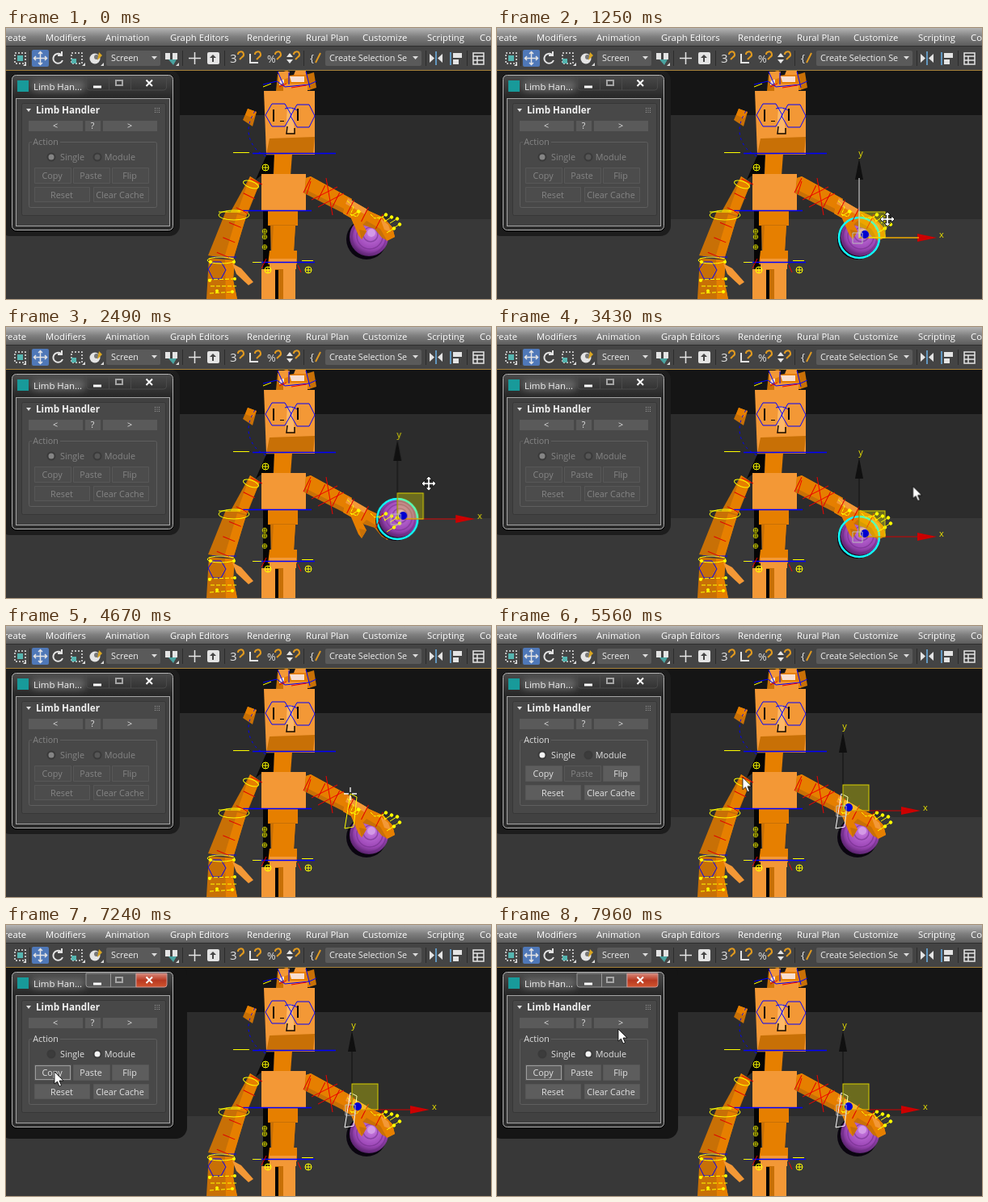
Recreate the animation shown at these times as an HTML page. Size 600 px wide and 336 px high, loop 8000 ms.

```html
<!DOCTYPE html>
<html lang="en">
<head>
<meta charset="utf-8">
<title>Character rig and tool panel</title>
<style>
html, body { margin: 0; width: 100%; height: 100%; overflow: hidden; background: #151515; }
svg { display: block; width: 600px; height: 336px; font: 11px "Open Sans", "Noto Sans", sans-serif; }
.menu { font-size: 11.3px; fill: #fff; }
.ui { font-size: 10.8px; }
.mid { text-anchor: middle; }
.line { fill: none; }
.lt { fill: #f39836; } .md { fill: #e67f00; } .dk { fill: #c87006; } .sh { fill: #050505; }
.blue { stroke: #00f; } .yel { stroke: #ff0; } .red { stroke: #f00000; }
.tick { fill: none; stroke: #e00000; stroke-dasharray: 1 19; }
.axis { font-size: 11px; fill: #e8e000; text-anchor: middle; }

/* One loop is 8 s, so 1% is 80 ms. */
.ball, .cursor { animation: 8s linear infinite; }
.ball { animation-name: ball; }
.cursor { animation-name: cursor; }
.sel, .hot, .hover, .wrist, .front, .arrow, .cross, .move, .active, .passive, .on, .pasteOn,
.single, .module, .focusModule, .focusCopy, .plate, .pastePlate {
  animation: 8s step-end infinite;
}
.sel { animation-name: sel; }
.hot { animation-name: hot; }
.hover { animation-name: hover; }
.wrist { animation-name: wrist; }
.front { animation-name: front; }
.arrow { animation-name: arrow; }
.cross { animation-name: cross; }
.move { animation-name: move; }
.active { animation-name: active; }
.passive { animation-name: passive; }
.on { animation-name: on; }
.pasteOn { animation-name: pasteOn; }
.plate { animation-name: plate; }
.pastePlate { animation-name: pastePlate; }
.single { animation-name: single; }
.module { animation-name: module; }
.focusModule { animation-name: focusModule; }
.focusCopy { animation-name: focusCopy; }

@keyframes ball {
  0%, 16.1% { transform: translate(448px, 260px); }
  18.1% { transform: translate(467px, 255px); }
  24.1%, 24.6% { transform: translate(394px, 268px); }
  26.6% { transform: translate(390px, 282px); }
  31.1% { transform: translate(484px, 239px); }
  32% { transform: translate(489px, 215px); }
  33%, 38.74% { transform: translate(482px, 189px); }
  38.75%, 100% { transform: translate(448px, 260px); }
}
@keyframes cursor {
  0%, 4.6% { transform: translate(640px, 300px); }
  9.4%, 10.6% { transform: translate(456px, 262px); }
  12.1%, 16.1% { transform: translate(483px, 237px); }
  18.1% { transform: translate(506px, 232px); }
  24.1% { transform: translate(459px, 256px); }
  24.6% { transform: translate(459px, 254px); }
  26.6% { transform: translate(452px, 262px); }
  31.1% { transform: translate(523px, 195px); }
  33% { transform: translate(522px, 150px); }
  34.6%, 41.9% { transform: translate(517px, 203px); }
  48.75%, 51.9% { transform: translate(500px, 165px); }
  57.4% { transform: translate(430px, 206px); }
  58.3%, 65.5% { transform: translate(426px, 208px); }
  75% { transform: translate(137px, 160px); }
  76%, 79.5% { transform: translate(135px, 162px); }
  88.5%, 92.5% { transform: translate(60px, 182px); }
  99.5%, 100% { transform: translate(150px, 129px); }
}
@keyframes sel { 0% { opacity: 0 } 10.6% { opacity: 1 } 48.75% { opacity: 0 } }
@keyframes hot { 0% { opacity: 0 } 12.1% { opacity: 1 } 16.1% { opacity: 0 } }
@keyframes hover { 0% { opacity: 0 } 57.4% { opacity: 1 } 59.9% { opacity: 0 } }
@keyframes wrist { 0% { opacity: 0 } 59.9% { opacity: 1 } }
@keyframes front { 0% { opacity: 1 } 26.6% { opacity: 0 } 38.75% { opacity: 1 } }
@keyframes arrow { 0% { opacity: 1 } 9.4% { opacity: 0 } 35.1% { opacity: 1 } 57.4% { opacity: 0 } 67% { opacity: 1 } }
@keyframes cross { 0% { opacity: 0 } 9.4% { opacity: 1 } 10.6% { opacity: 0 } 57.4% { opacity: 1 } 59.9% { opacity: 0 } }
@keyframes move { 0% { opacity: 0 } 10.6% { opacity: 1 } 35.1% { opacity: 0 } 59.9% { opacity: 1 } 67% { opacity: 0 } }
@keyframes active { 0% { opacity: 0 } 76% { opacity: 1 } }
@keyframes passive { 0% { opacity: 1 } 76% { opacity: 0 } }
@keyframes on { 0% { fill: #858585 } 59.9% { fill: #e2e2e2 } }
@keyframes pasteOn { 0% { fill: #858585 } 90.5% { fill: #e2e2e2 } }
@keyframes plate { 0% { fill: #4c4c4c } 59.9% { fill: #5d5d5d } }
@keyframes pastePlate { 0% { fill: #4c4c4c } 90.5% { fill: #5d5d5d } }
@keyframes single { 0% { fill: #858585 } 59.9% { fill: #f4f4f4 } 77% { fill: #3c3c3c } }
@keyframes module { 0% { fill: #565656 } 59.9% { fill: #3c3c3c } 77% { fill: #f4f4f4 } }
@keyframes focusModule { 0% { opacity: 0 } 77% { opacity: 1 } 90.5% { opacity: 0 } }
@keyframes focusCopy { 0% { opacity: 0 } 90.5% { opacity: 1 } }
</style>
</head>
<body>
<svg viewBox="0 0 600 336">
<defs>
  <linearGradient id="menuBg" x2="0" y2="1">
    <stop offset="0" stop-color="#b4b4b4"/><stop offset=".5" stop-color="#7e7e7e"/><stop offset="1" stop-color="#5c5c5c"/>
  </linearGradient>
  <linearGradient id="titleBg" x2="0" y2="1">
    <stop offset="0" stop-color="#4b4b4b"/><stop offset=".15" stop-color="#262626"/><stop offset="1" stop-color="#2c2c2c"/>
  </linearGradient>
  <linearGradient id="closeBg" x2="0" y2="1">
    <stop offset="0" stop-color="#d98a7c"/><stop offset=".5" stop-color="#b93a22"/><stop offset="1" stop-color="#d0542e"/>
  </linearGradient>
  <radialGradient id="ballBg" cx=".56" cy=".4" r=".6">
    <stop offset="0" stop-color="#cc86e2"/><stop offset=".25" stop-color="#b866d2"/>
    <stop offset=".7" stop-color="#9c46b6"/><stop offset="1" stop-color="#5c2470"/>
  </radialGradient>
  <filter id="soft" x="-20%" y="-60%" width="140%" height="220%"><feGaussianBlur stdDeviation="4"/></filter>
  <g id="knob" class="line yel"><circle r="4"/><path d="M-4 0H4M0-4V4"/></g>
  <g id="pin" class="yel"><path d="M0 0L8-5"/><circle cx="9" cy="-5.500" r="1.800" fill="#ff0"/></g>
  <path id="hook" class="line" stroke="#e09a20" stroke-width="2" d="M0 3A3.500 3.500 0 1 1 5 6L2 9"/>

  <g id="gizmo">
    <path d="M0 0V-74" stroke="#111"/>
    <path d="M-5-72H5L0-98Z" fill="#101010"/>
    <path d="M0 0H74" stroke="#d00000" stroke-width="1.2"/>
    <path d="M72-5V5L96 0Z" fill="#cc0000"/>
    <rect y="-32" width="32" height="32" fill="#ff0" fill-opacity=".3" stroke="#d8d000"/>
    <text class="axis" x="2" y="-101">y</text><text class="axis" x="102" y="0">x</text>
    <circle cx="7" cy="-4" r="5" fill="#0000d0"/>
    <path class="line" stroke="#bbb" d="M-8 7V-6H4V7Z"/>
  </g>

  <g id="hand">
    <path class="md" d="M421 211L445 225 467 235 478 247 481 259 471 264 463 250 440 243 417 230Z"/>
    <path class="lt" d="M423 211L447 225 444 231 420 218Z"/>
    <path class="dk" d="M446 239L463 249 471 263 465 260 456 249 441 244Z"/>
    <path class="lt" d="M463 236L473 244 476 253 468 250Z"/>
    <path class="md" d="M425 231L434 229 446 252 440 262 436 257Z"/>
    <path class="dk" d="M437 250L446 252 440 262Z"/>
  </g>
</defs>

<!-- viewport -->
<path fill="#151515" d="M0 53H600V108H0Z"/>
<path fill="#2c2c2c" d="M0 108H600V237H0Z"/>
<path fill="#383838" d="M0 237H600V336H0Z"/>

<!-- body -->
<g>
  <path class="sh" d="M309 188L318 181V300H327V226L332 158H322Z"/>
  <path class="dk" d="M336 57L346 53H349L344 78H334ZM371 58L381 55 384 74 375 77Z"/>
  <path class="md" d="M343 60L372 56 376 77H343Z"/>
  <path fill="#f8ded0" d="M339 62L344 57V68L338 71ZM351 60H369V67H353Z"/>
  <path class="lt" d="M337 54H351L349 62 337 66ZM358 53H371V58H356ZM343 69H373V78H343Z"/>
  <path class="dk" d="M299 100L310 104 305 122 293 114Z"/>
  <path class="md" d="M299 100L310 104 306 112 296 108Z"/>
  <path class="md" d="M332 156H354L352 183H331Z"/>
  <path class="lt" d="M319 78H382V157H322Z"/>
  <path class="dk" d="M326 137L382 135 380 156 322 157Z"/>
  <path class="sh" d="M330 101h2v15h-2zM360 100h2v15h-2zM339 115h5v1h-5z"/>
  <path fill="#ffb868" d="M348 98H354L357 130H346Z"/>
  <path class="line" stroke="#140a00" stroke-width="1.500" d="M348 122L347 131H357V124"/>
  <path class="md" d="M324 226H361V245H324Z"/>
  <path class="lt" d="M316 181H371V227H316Z"/>
  <path class="dk" d="M327 244H358L356 277H328Z"/>
  <path class="md" d="M331 245H358L356 277H329Z"/>
  <path class="md" d="M326 276H360V293H324Z"/>
  <path class="lt" d="M326 286H359V299H326Z"/>
  <path class="dk" d="M316 299H358V336H316Z"/>
  <path class="lt" d="M316 299H333V336H316ZM343 299H358V336H343Z"/>
  <path class="sh" d="M333 300H337V336H333Z"/>

  <path class="dk" d="M302 184L314 192 295 240 275 233Z"/>
  <path class="md" d="M302 184L314 192 297 232 286 229Z"/>
  <path class="dk" d="M272 227L297 234 281 287 250 282Z"/>
  <path class="md" d="M286 231L297 234 281 287 270 285Z"/>
  <path class="dk" d="M251 285L283 288 281 313 286 336H248Z"/>
  <path class="md" d="M271 287L283 288 281 312 286 336H272Z"/>
  <path class="lt" d="M280 292L291 298 306 315 300 319 285 305Z"/>

  <path class="dk" d="M371 186L377 184 428 212 420 231 369 205Z"/>
  <path class="md" d="M371 186L377 184 428 212 422 226 370 200Z"/>
</g>

<!-- ball between palm and fingers -->
<use href="#hand"/>
<g class="ball">
  <circle cx="-2" cy="2" r="25" fill="#0a0510"/>
  <circle cx="1" cy="-1" r="24" fill="url(#ballBg)"/>
  <g class="line" stroke="#6e2c86" stroke-opacity=".55" stroke-width="1.500">
    <circle cx="3" cy="-4" r="9"/><circle cx="2" cy="-2" r="16"/><circle cx="1" cy="-1" r="21"/>
  </g>
  <circle cx="4" cy="-6" r="5" fill="#d39ae6"/>
</g>
<use href="#hand" class="front"/>
<g class="ball"><circle class="sel line" r="25" stroke="#1ff" stroke-width="2.500"/></g>

<!-- rig controls -->
<g class="line">
  <g class="blue">
    <path d="M321 108L329 94H345L353 108 345 122H329ZM352 109L360 95H375L382 109 375 123H360ZM345 100Q353 97 360 102"/>
    <path d="M318 70L335 66 345 73 375 70 384 66M336 54L344 72M371 54L376 74M350 70V55"/>
    <path d="M308 103Q296 122 302 138T324 160" stroke-dasharray="3 4"/>
    <path d="M305 155.500H408M293 226.500H378M308 290.500H382" stroke-width="1.300"/>
    <path d="M250 299L256 290H266L272 300 266 311H256ZM255 284H285"/>
  </g>
  <g class="yel">
    <path d="M281 154.500H301M318 73L328 69M263 228H290M305 290.500H316M366 288.500H380"/>
    <ellipse cx="282" cy="232" rx="19" ry="6"/>
    <ellipse cx="266" cy="288" rx="17" ry="4"/>
    <ellipse cx="303" cy="194" rx="10" ry="4" transform="rotate(20 303 194)"/>
    <path d="M250 312L284 311M253 320H285M252 329L282 327" stroke-dasharray="5 2"/>
    <path d="M422 214L430 222 426 231 434 234 439 227M451 231L456 236 466 234 470 241" stroke-dasharray="4 1"/>
  </g>
  <g class="red">
    <path d="M338 73L347 69M353 74L372 71M316 298L322 286M361 294L365 303M377 190L372 206M396 186L404 232M410 197L378 213M418 205L386 222"/>
  </g>
  <path class="tick" stroke-width="16" d="M310 190L286 238 268 282"/>
  <path class="tick" stroke-width="20" d="M372 195L424 221 468 243"/>
</g>
<use href="#knob" x="321" y="173"/><use href="#knob" x="324" y="300"/><use href="#knob" x="374" y="300"/>
<g transform="translate(320 252) scale(.7)"><use href="#knob"/><use href="#knob" y="10"/><use href="#knob" y="28"/></g>
<use href="#pin" x="461" y="237"/><use href="#pin" x="468" y="240"/><use href="#pin" x="475" y="242"/>
<use href="#pin" x="478" y="249"/><use href="#pin" x="471" y="254"/><use href="#pin" x="427" y="233"/>
<g fill="#ff0">
  <circle cx="252" cy="313" r="2"/><circle cx="283" cy="311" r="2"/><circle cx="253" cy="290" r="2"/>
  <circle cx="282" cy="290" r="2"/><circle cx="261" cy="326" r="2"/><circle cx="280" cy="327" r="2"/>
</g>
<path class="line yel hover" d="M426 208L434 212 430 249 419 251Z"/>
<g class="wrist">
  <path class="line" stroke="#fff" d="M426 208L434 212 430 249 419 251Z"/>
  <use href="#gizmo" x="428" y="229"/>
</g>
<g class="ball">
  <g class="sel">
    <use href="#gizmo"/>
    <g class="hot"><path d="M0 0V-74" stroke="#eee"/><path d="M12 0H74" stroke="#ff0"/></g>
  </g>
</g>

<!-- floating panel -->
<rect class="passive" x="-8" y="52" width="223" height="206" rx="13" fill="#1d1d1d"/>
<rect class="active" x="-8" y="48" width="232" height="217" rx="14" fill="#151515"/>
<rect x="6.500" y="57.500" width="201" height="195" rx="6" fill="#0a0a0a"/>
<rect x="7.500" y="58.500" width="199" height="192" rx="5" fill="url(#titleBg)" stroke="#b5b5b5"/>
<rect x="32" y="66" width="66" height="13" rx="5" fill="#a0a0a0" opacity=".45" filter="url(#soft)"/>
<rect x="14" y="65" width="14" height="14" fill="#189a9a"/>
<text x="34" y="77" fill="#f2f2f2" font-size="11.400">Limb Han...</text>
<path class="line passive" stroke="#4a4a4a" d="M99.500 60V74Q100 77 103 77H195Q198 77 198.500 74V60M127.500 60V77M154.500 60V77"/>
<g class="active">
  <path d="M99 60V74Q99 77 102 77H161V60Z" fill="#555" stroke="#999"/>
  <path d="M129.500 60V77" stroke="#999"/>
  <path d="M161 60H199V74Q199 77 196 77H161Z" fill="url(#closeBg)" stroke="#c99"/>
</g>
<path class="line" stroke="#fff" stroke-width="3" d="M108 73H118"/>
<rect class="line" x="136" y="65" width="8" height="6" stroke="#a5a5a5" stroke-width="2"/>
<path class="line" stroke="#fff" stroke-width="2" d="M173.500 64.500L181 72M181 64.500L173.500 72"/>
<rect x="12.500" y="87.500" width="190" height="158" fill="#414141" stroke="#a5a5a5"/>
<rect x="19.500" y="93.500" width="178" height="139" rx="2" fill="#484848" stroke="#373737"/>
<path d="M25 100H31L28 104Z" fill="#ddd"/>
<text x="37" y="106" fill="#f0f0f0" font-weight="700" font-size="11.700">Limb Handler</text>
<path class="line" stroke="#a0a0a0" stroke-dasharray="1 1.500" d="M184 99.500H190M184 102H190M184 104.500H190"/>
<g class="ui mid">
  <path fill="#5a5a5a" d="M28 115h67v13h-67zM98 115h19v13h-19zM120 115h67v13h-67z"/>
  <g fill="#e2e2e2"><text x="61" y="125">&lt;</text><text x="107" y="125">?</text><text x="153" y="125">&gt;</text></g>
  <rect class="line" x="28.500" y="141.500" width="158" height="81" rx="2" stroke="#5e5e5e"/>
  <path fill="#484848" d="M32 138H67V146H32Z"/>
  <text class="on" x="49" y="145">Action</text>
  <circle cx="56" cy="160" r="5.500" fill="#3a3a3a"/><circle class="single" cx="56" cy="160" r="3.500"/>
  <circle cx="113" cy="160" r="5.500" fill="#3a3a3a"/><circle class="module" cx="113" cy="160" r="3.500"/>
  <text class="on" x="82" y="164">Single</text><text class="on" x="141" y="164">Module</text>
  <g stroke="#575757">
    <path class="plate" d="M35.500 173.500h45v19h-45zM131.500 173.500h45v19h-45zM35.500 197.500h68v18h-68zM108.500 197.500h68v18h-68z"/>
    <path class="pastePlate" d="M83.500 173.500h45v19h-45z"/>
  </g>
  <text class="on" x="57" y="187">Copy</text><text class="pasteOn" x="105" y="187">Paste</text><text class="on" x="153" y="187">Flip</text>
  <text class="on" x="69" y="211">Reset</text><text class="on" x="141" y="211">Clear Cache</text>
  <g class="line" stroke="#ddd" stroke-dasharray="1 1">
    <path class="focusModule" d="M121.500 153.500h40v14h-40z"/>
    <path class="focusCopy" d="M36.500 174.500h43v17h-43z"/>
  </g>
</g>

<!-- menu and toolbar -->
<path fill="#444" d="M0 22H600V53H0Z"/>
<path fill="#a8823a" d="M0 52H600V53H0Z"/>
<rect width="600" height="22" fill="url(#menuBg)"/>
<path fill="#2e2e2e" d="M0 22H600V23H0Z"/>
<g class="menu">
  <text x="25" y="16" text-anchor="end">Create</text><text x="49" y="16">Modifiers</text>
  <text x="123" y="16">Animation</text><text x="203" y="16">Graph Editors</text>
  <text x="298" y="16">Rendering</text><text x="371" y="16">Rural Plan</text>
  <text x="441" y="16">Customize</text><text x="521" y="16">Scripting</text>
  <text x="586" y="16">Content</text>
</g>
<rect x="32" y="27" width="21" height="21" rx="2" fill="#4f78b8"/>
<g fill="#5a5a5a"><rect x="124" y="28" width="67" height="19" rx="2"/><rect x="395" y="28" width="119" height="19" rx="2"/></g>
<g class="ui" fill="#eee"><text x="130" y="41">Screen</text><text x="400" y="41">Create Selection Se</text></g>
<path fill="#ddd" d="M180 35h7l-3.500 4zM503 35h7l-3.500 4zM25 47v-4l-4 4zM98 47v-4l-4 4zM121 47v-4l-4 4zM214 47v-4l-4 4z"/>
<path class="line" stroke="#2c2c2c" d="M29.500 28V47M218.500 28V47M270.500 28V47M368.500 28V47M519.500 28V47M570.500 28V47"/>
<g class="line" stroke="#e4e4e4" stroke-width="1.500">
  <path d="M11 31H24V44H11Z" stroke-dasharray="2 2"/>
  <path d="M35 37.500H50M42.500 30V45M40 32L42.500 29.500 45 32M40 43L42.500 45.500 45 43M37 35L34.500 37.500 37 40M48 35L50.500 37.500 48 40"/>
  <path d="M68 33A6 6 0 1 0 70 40M69 29V34H64" stroke-width="2"/>
  <path d="M81 31H94V44H81Z" stroke-dasharray="2 2"/>
  <path d="M226 37.500H241M233.500 30V45"/>
  <path d="M550 30V46" stroke="#6db3e8"/>
  <path d="M578 31H591V45H578ZM578 35H591M578 40H591M583 35V45"/>
  <path d="M532 29V46" stroke="#6db3e8"/>
</g>
<g fill="#e4e4e4">
  <path d="M14 34H21V41H14ZM81 38H87V44H81Z" fill="#55b5b0"/>
  <circle cx="110" cy="38" r="6.500"/><circle cx="112" cy="36" r="3" fill="#777"/>
  <path d="M115 30L119 34 113 40Z" fill="#d9a520"/>
  <path d="M197 31h6v8h-6zM206 31h6v8h-6z"/><path d="M201 39L207 46 211 39Z" fill="#4aa3a0"/>
  <rect x="249" y="30" width="15" height="15" rx="2"/><path d="M256 33L260 37H257V42H255V37H252Z" fill="#444"/>
  <path d="M524 32L530 37.500 524 43ZM540 32L534 37.500 540 43ZM553 31H564V37H553ZM553 39H560V45H553Z"/>
  <g font-size="15"><text x="277" y="43">3</text><text x="323" y="43" font-size="13">%</text></g>
  <path d="M301 32H303V42H312V44H301ZM347 36L351 31 355 36ZM347 39H355L351 44Z"/>
  <text x="376" y="42" font-size="13">{</text>
</g>
<use href="#hook" x="287" y="30"/><use href="#hook" x="308" y="30"/><use href="#hook" x="333" y="30"/><use href="#hook" x="356" y="30"/>
<path d="M383 43L389 31" stroke="#e09a20" stroke-width="2"/>

<!-- pointer -->
<g class="cursor">
  <path class="arrow" fill="#fff" stroke="#000" stroke-width=".8" d="M0 0V15L3.500 12 6 18 8.500 17 6 11H11Z"/>
  <path class="cross line" stroke="#fff" stroke-width="1.300" d="M-8 0H-2M2 0H8M0-8V-2M0 2V8"/>
  <path class="move" fill="#fff" stroke="#000" stroke-width=".8" d="M0-9L4-5H1.300V-1.300H5V-4L9 0 5 4V1.300H1.300V5H4L0 9-4 5H-1.300V1.300H-5V4L-9 0-5-4V-1.300H-1.300V-5H-4Z"/>
</g>
</svg>
</body>
</html>
```
